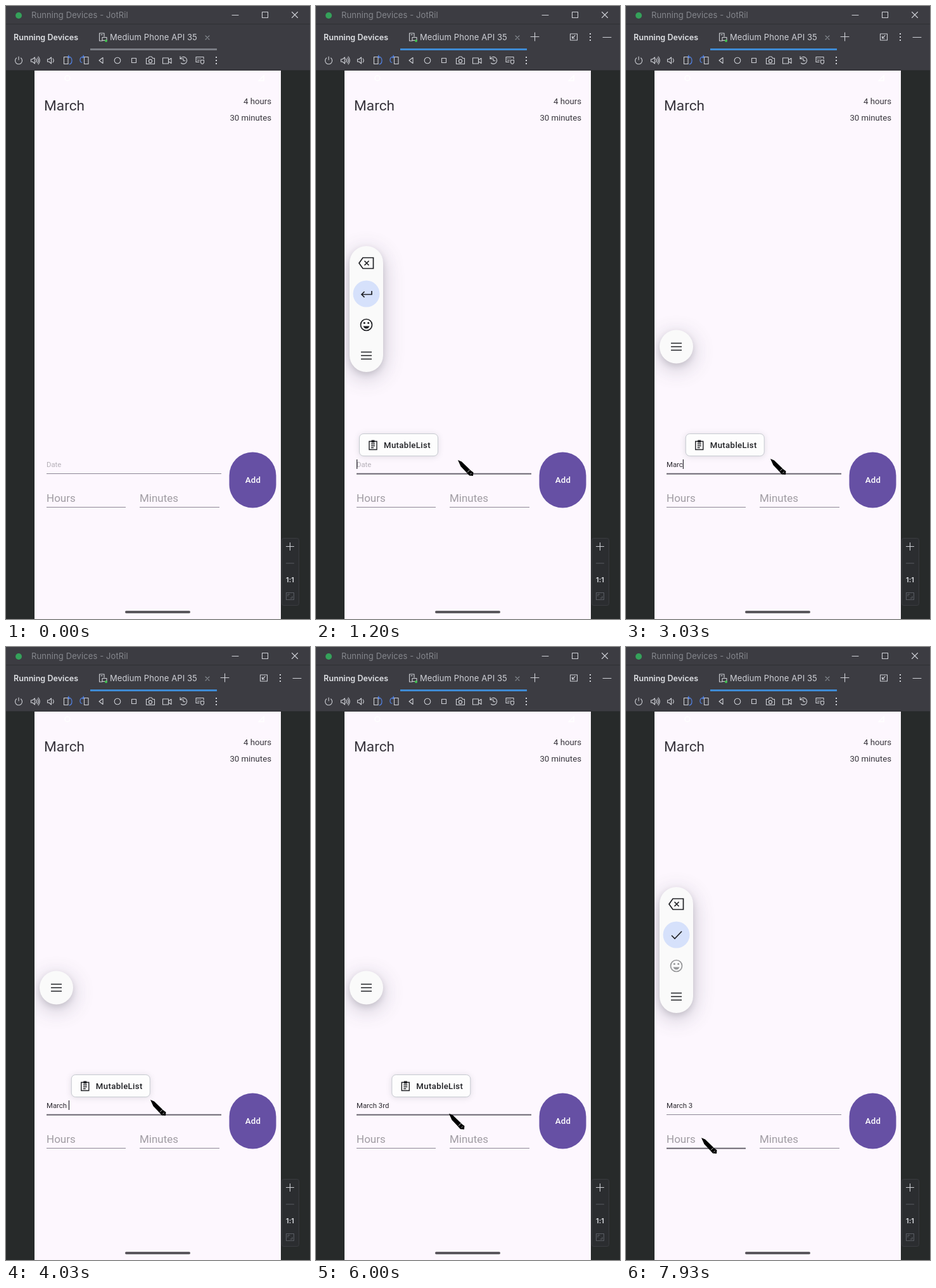
These frames come from a looping animation (480 by 968 pixels, 8000 ms). An HTML page:

```html
<!DOCTYPE html>
<html lang="en">
<head>
<meta charset="utf-8">
<title>Running Devices</title>
<style>
html, body { margin: 0; width: 100%; height: 100%; overflow: hidden; background: #272a2a; }
svg { display: block; width: 480px; height: 968px; }
text { white-space: pre; }
.ide { font: 13px Inter, sans-serif; letter-spacing: .1px; }
.app { font: 13.2px Roboto, sans-serif; fill: #38353d; }
.line { fill: none; stroke: #ced0d6; stroke-width: 1.1; stroke-linecap: round; stroke-linejoin: round; }
.dim { stroke: #868a91; }
.off { stroke: #5a5d63; }
.blue { stroke: #548af7; }
.ink { fill: none; stroke: #1f2024; stroke-width: 1.7; }
.fill { fill: #ced0d6; stroke: none; }
</style>
</head>
<body>
<svg viewBox="0 0 480 968">
  <defs>
    <filter id="soft" x="-150%" y="-60%" width="400%" height="220%"><feGaussianBlur stdDeviation="17"/></filter>
    <filter id="near" x="-60%" y="-60%" width="220%" height="220%"><feGaussianBlur stdDeviation="5"/></filter>
    <clipPath id="screen"><rect x="45" y="102" width="389" height="866"/></clipPath>
  </defs>

  <!-- window chrome -->
  <rect width="480" height="968" fill="#272a2a"/>
  <rect width="480" height="102" fill="#3c3c42"/>
  <path d="M0 28.5H480M0 101.5H480" stroke="#2f3034"/>
  <circle cx="20" cy="15" r="5" fill="#35a15a"/>
  <text class="ide" x="40" y="19" fill="#85878d">Running Devices - JotRil</text>
  <path class="line" d="M357 14.500h10M404.500 9.500h9v9h-9zM451.500 9.500l9 9m0-9l-9 9"/>
  <text class="ide" x="12" y="54" fill="#dfe1e5" style="font-weight:600;font-size:12.6px;letter-spacing:0">Running Devices</text>
  <g class="line">
    <path d="M152 55h-4.500v-12h7.500v5M150 45.500h2M152 49.500h7v5h-7z"/>
    <circle cx="158" cy="55" r="2" fill="#3fc24f" stroke="none"/>
  </g>
  <text class="ide" x="164" y="54" fill="#ced0d6">Medium Phone API 35</text>
  <path class="line dim" d="M315 47l6 6m0-6l-6 6"/>
  <rect id="tab" x="133" y="67" width="200" height="3"/>
  <g id="tools" class="line">
    <path d="M339 48.500h13m-6.500-6.500v13M453 49.500h13M401.500 44h11v10h-11zM409 46.500l-4.500 4.500m0-3.500v3.500h3.500"/>
    <path class="fill" d="M432 43h2v2h-2zm0 5h2v2h-2zm0 5h2v2h-2z"/>
  </g>

  <!-- emulator toolbar -->
  <g class="line">
    <path d="M20 80v5M16.500 82a5.500 5.500 0 1 0 7 0"/>
    <path d="M39.500 84h2.500l3.500-3v10l-3.500-3h-2.500zM47.500 83.500q2 2.500 0 5M49.500 82q3.500 4 0 8M51 80q4.500 6 0 12"/>
    <path d="M65.500 84h2.500l3.500-3v10l-3.500-3h-2.500zM74 83q2.500 3 0 6"/>
    <path d="M91.500 80.500h6.500v11h-6.500z"/><path class="blue" d="M99 80q5 .5 5 6t-4 6m-1-14l-1 2 2 2"/>
    <path d="M123.500 80.500h6.500v11h-6.500z"/><path class="blue" d="M122 80q-5 .5-5 5t3 4m2-11l1 2-2 2"/>
    <path d="M153 81.500v9l-6-4.500z"/>
    <circle cx="176" cy="86" r="4.800"/>
    <path d="M198.500 82.500h7v7h-7z"/>
    <path d="M221.500 82.500h3l1.500-2.500h4l1.500 2.500h3v9h-13z"/><circle cx="228" cy="87" r="2.600"/>
    <path d="M247.500 82h9v9h-9zM257 85l4-2.500v8l-4-2.500"/>
    <path d="M275.500 83a5.500 5.500 0 1 1 1 7M275 79.500v4h4M280 83v3.500h3"/>
    <path d="M305 88.500h-5v-8h12v3M302 83h.5m2 0h.5m2 0h.5m-5 3h3M307.500 85.500h5v4q-2.500 4-5 0z"/>
    <path class="fill" d="M331 80h2v2h-2zm0 5h2v2h-2zm0 5h2v2h-2z"/>
  </g>

  <!-- zoom panel -->
  <rect x="435.500" y="840.500" width="27" height="106" rx="3" fill="#2b2d30" stroke="#3a3c40"/>
  <path class="line" d="M442.500 853.500h12m-6-6v12"/>
  <path class="line off" d="M442.500 880h12M442.500 926.500h12v11h-12zM445 932v-3h3m4 3v3h-3"/>
  <text class="ide" x="448.500" y="910" text-anchor="middle" fill="#dfe1e5" style="font-weight:600;font-size:11px">1:1</text>

  <!-- phone screen -->
  <g clip-path="url(#screen)">
    <rect x="45" y="102" width="389" height="866" fill="#fdf7fe"/>
    <g fill="none" stroke="#fff" stroke-width="1.500"><circle cx="97" cy="114" r="4"/><path d="M399 118l8-8v8z"/></g>
    <text class="app" x="60" y="165" style="font-size:22.7px">March</text>
    <text class="app" x="419" y="155" text-anchor="end">4 hours</text>
    <text class="app" x="419" y="181" text-anchor="end">30 minutes</text>

    <text id="date" class="app" x="64" y="727.500" style="font-size:11.35px"></text>
    <rect id="dateLine" x="64" width="276"/>
    <text class="app" x="64" y="783" style="font-size:17px;fill:#a09ca3">Hours</text>
    <rect id="hoursLine" x="64" width="125"/>
    <text class="app" x="211" y="783" style="font-size:17px;fill:#a09ca3">Minutes</text>
    <rect x="211" y="791" width="126" height="1" fill="#8d8795"/>
    <rect id="caret" width="1.300" fill="#38353d"/>

    <rect x="352.500" y="704.500" width="74" height="88" rx="37" fill="#6650a4"/>
    <text class="app" x="390" y="753" text-anchor="middle" style="font-weight:500;fill:#fff;letter-spacing:.3px">Add</text>
    <rect x="188" y="955" width="103" height="4" rx="2" fill="#5a575d"/>

    <g id="pill">
      <rect class="body" x="53" width="53" rx="26.500" fill="#4a4660" opacity=".3" filter="url(#soft)" transform="translate(0 8)"/>
      <rect class="body" x="53" width="53" rx="26.500" fill="#4a4a50" opacity=".16" filter="url(#near)" transform="translate(0 4)"/>
      <rect class="body" x="53" width="53" rx="26.500" fill="#fafafa"/>
      <g id="keys">
        <path class="ink" d="M68 406l6-8.500h16.500v17h-16.500zM76.500 402.500l7 7m0-7l-7 7"/>
        <circle cx="79.500" cy="454.500" r="21" fill="#d6e1fb"/>
        <path id="enter" class="ink" d="M88 450v5.500h-16m4.500-4.500l-4.500 4.500 4.500 4.500"/>
        <path id="check" class="ink" d="M72 455.500l5 5 11-11.500"/>
        <g id="smile">
          <circle class="ink" cx="79.500" cy="503.500" r="9"/>
          <path d="M74.500 505.500h10q-1.500 4-5 4t-5-4z" fill="#1f2024"/>
          <circle cx="76.300" cy="500.500" r="1.500" fill="#1f2024"/><circle cx="82.700" cy="500.500" r="1.500" fill="#1f2024"/>
        </g>
      </g>
      <path id="menu" class="ink" d="M71-5.500h17M71 0h17M71 5.500h17"/>
    </g>

    <g id="chip">
      <rect x="0" y="1" width="125" height="36" rx="7" fill="#5a5a66" opacity=".18" filter="url(#near)"/>
      <rect x=".5" y=".5" width="124" height="35" rx="6.500" fill="#fdfdfd" stroke="#c6cad0"/>
      <g id="label">
        <path class="ink" style="stroke-width:1.400" d="M16 12.500h12v13h-12zM19 16.500h6m-6 3h6m-6 3h4"/>
        <path d="M19.500 10.500h5v4h-5z" fill="#1f2024"/>
        <text class="app" x="39" y="23" style="font-weight:500;letter-spacing:.36px;fill:#1f2024">MutableList</text>
      </g>
    </g>
  </g>

  <g id="pen">
    <path d="M0 0l6 2.500 15 14.500 3.500 2.500-.5 5.500-6-.5-5-5.500-8.500-9z"/>
    <path d="M15 19.500l4-4M19.500 22.500l2-2" stroke="#e8e8ea" stroke-width=".9"/>
  </g>
</svg>
<script>
const LOOP = 8000, FOCUS_DATE = 790, POPUP = 868, COLLAPSE = 2460, FOCUS_HOURS = 7420;
const $ = id => document.getElementById(id);
const set = (el, attrs) => { for (const k in attrs) el.setAttribute(k, attrs[k]); };
const show = (id, on) => { $(id).style.visibility = on ? 'visible' : 'hidden'; };
const mix = (a, b, k) => a + (b - a) * k;
const ramp = (t, start, length) => Math.min(1, Math.max(0, (t - start) / length));
const ease = k => 1 - (1 - k) ** 3;
const smooth = k => k * k * (3 - 2 * k);

const edits = [[0, ''], [2480, 'M'], [2640, 'Ma'], [2800, 'Mar'], [2960, 'Marc'], [3110, 'March'],
  [3640, 'March '], [4350, 'March 3'], [5150, 'March 3r'], [5400, 'March 3rd'],
  [6950, 'March 3r'], [7110, 'March 3']];
// time, x, y of the pen tip
const path = [[560, 252, 690], [760, 224, 717], [1400, 224, 717], [1650, 228, 715], [5620, 228, 715],
  [5820, 246, 722], [6330, 121, 773], [7150, 121, 773], [7350, 119, 775], [8000, 119, 775]];

const ruler = document.createElement('canvas').getContext('2d');
const textWidth = s => {
  ruler.font = '11.35px Roboto, sans-serif';
  return ruler.measureText(s).width;
};

function penAt(t) {
  const i = Math.max(1, path.findIndex(p => p[0] > t));
  const [a, b] = [path[i - 1], path[i]];
  const k = smooth(ramp(t, a[0], b[0] - a[0]));
  return [mix(a[1], b[1], k), mix(a[2], b[2], k)];
}

function underline(id, y, focused) {
  set($(id), { y: focused ? y - .3 : y, height: focused ? 2 : 1, fill: focused ? '#6a6670' : '#8d8795' });
}

function drawPill(t, pop) {
  const late = t >= FOCUS_HOURS;
  const open = late ? ease(ramp(t, FOCUS_HOURS, 280)) : 1 - smooth(ramp(t, COLLAPSE, 260));
  const top = mix(511.5, 379, open), bottom = mix(564.5, 578, open);
  show('pill', t >= POPUP);
  set($('pill'), {
    transform: `translate(${mix(63, 79.5, pop)} ${mix(485, 478.5, pop)}) scale(${mix(.71, 1, pop)}) translate(-79.5 -478.5)`,
    opacity: ramp(t, POPUP, 30)
  });
  document.querySelectorAll('.body').forEach(el => set(el, { y: top, height: bottom - top }));
  set($('keys'), { opacity: ramp(open, .6, .4) });
  set($('menu'), { transform: `translate(0 ${mix(538, 552, open)})` });
  show('enter', !late);
  show('check', late);
  set($('smile'), { opacity: late ? .45 : 1 });
}

function drawChip(t, x, pop) {
  const size = mix(.92, 1, pop);
  show('chip', t >= POPUP && t < FOCUS_HOURS);
  set($('chip'), { transform: `translate(${x} ${mix(682, 675, pop)})`, opacity: ramp(t, POPUP, 30) });
  set($('label'), { transform: `translate(62.5 18) scale(${size}) translate(-62.5 -18)` });
}

function draw(t) {
  const active = t >= 700, onDate = t >= FOCUS_DATE && t < FOCUS_HOURS, onHours = t >= FOCUS_HOURS;
  set($('tab'), { fill: active ? '#3f8bd4' : '#7a7d84' });
  show('tools', active);

  const [editTime, value] = edits.filter(e => e[0] <= t).pop();
  $('date').textContent = value || 'Date';
  $('date').style.fill = value ? '#2b282f' : '#b5b0b8';
  underline('dateLine', 738, onDate);
  underline('hoursLine', 791, onHours);

  const end = 64 + textWidth(value);
  const since = t - (onHours ? FOCUS_HOURS : Math.max(FOCUS_DATE, editTime));
  show('caret', since >= 0 && since % 1000 < 500);
  set($('caret'), onHours ? { x: 64, y: 766, height: 20 } : { x: end, y: 716, height: 15 });

  const pop = ease(ramp(t, POPUP, 300));
  drawChip(t, end + 4, pop);
  drawPill(t, pop);
  show('pen', t >= 560);
  set($('pen'), { transform: `translate(${penAt(t)})` });
}

const begin = performance.now();
function tick() {
  draw((performance.now() - begin) % LOOP);
  requestAnimationFrame(tick);
}
tick();
</script>
</body>
</html>
```
